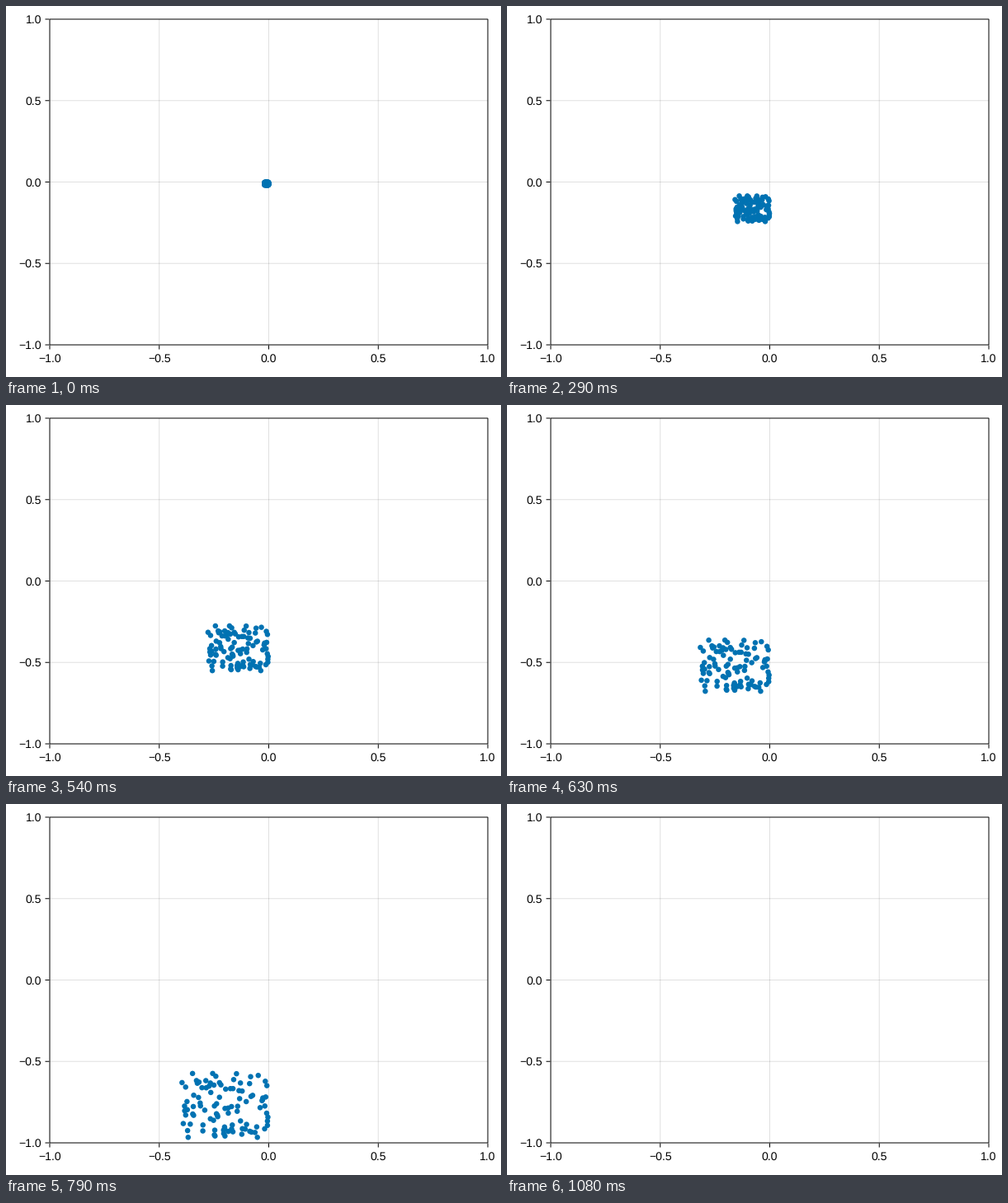
A matplotlib script for the animation above (4180 ms loop, 600 by 450 pixels).

```python
import numpy as np
import matplotlib.pyplot as plt
from matplotlib.animation import FuncAnimation
from matplotlib.patches import Rectangle

plt.rcParams["text.hinting"] = "none"

W, H, DPI = 600, 450, 100
PX = 72 / DPI                       # one pixel in points
LEFT, RIGHT, TOP, BOTTOM = 53, 584, 16, 411
LOOP, TICK, FPS = 4180, 10, 24      # ms, ms, steps per second
COUNT, DT, FALL = 100, 0.02, 0.003  # particles, step length, drop gained per step

# Leftward and downward launch speeds; a few fixed ones mark the cloud's edge
EDGE = [(0.99, 0.15), (0.87, 0.01), (0.64, 0.01), (0.12, 0.04),
        (0.01, 0.68), (0.13, 0.99), (0.50, 0.97), (0.92, 0.99)]
rng = np.random.default_rng(7)
speeds = np.vstack([EDGE, rng.uniform(0.01, 0.98, (COUNT - len(EDGE), 2))])


def to_px(x, y):
    return (LEFT + (x + 1) / 2 * (RIGHT - LEFT),
            BOTTOM - (y + 1) / 2 * (BOTTOM - TOP))


def positions(step):
    n = step + 1
    x = -speeds[:, 0] * DT * n
    y = -speeds[:, 1] * DT * n - FALL * n * (n - 1) / 2
    return np.column_stack(to_px(x, y))


def step_at(tick):
    """Last step begun by this tick; step times round to whole ticks."""
    rate = 1000 / TICK / FPS
    step = int(tick / rate) + 1
    while int(step * rate + 0.5) > tick:
        step -= 1
    return step


fig = plt.figure(figsize=(W / DPI, H / DPI), dpi=DPI, facecolor="white")
ax = fig.add_axes([0, 0, 1, 1])
ax.set_xlim(0, W)
ax.set_ylim(H, 0)
ax.axis("off")


def line(xs, ys, z=3, alpha=1):
    ax.plot(xs, ys, color="black", alpha=alpha, lw=PX, zorder=z,
            solid_capstyle="butt", snap=False)


def label(x, y, text, ha):
    ax.text(x, y, text, ha=ha, va="baseline", color="black",
            family="Liberation Sans", size=14 * PX)


def frame_box(**style):
    return Rectangle((LEFT, TOP), RIGHT - LEFT, BOTTOM - TOP, **style)


for v in np.linspace(-1, 1, 5):
    x, y = to_px(v, v)
    if abs(v) < 1:
        line([x, x], [TOP, BOTTOM], z=1, alpha=0.12)
        line([LEFT, RIGHT], [y, y], z=1, alpha=0.12)
    line([x, x], [BOTTOM + 0.5, BOTTOM + 5.5])
    line([LEFT - 5.5, LEFT - 0.5], [y, y])
    text = f"{v:.1f}".replace("-", "\u2212")
    label(x, 432, text, "center")
    label(43, y + 5, text, "right")

ax.add_patch(frame_box(fill=False, ec="black", lw=PX, zorder=3, snap=False))

# One size per dot keeps their subpixel positions
dots = ax.scatter(*positions(0).T, s=np.full(COUNT, (6.5 * PX) ** 2),
                  color="#0072B2", linewidths=0, zorder=2)
dots.set_clip_path(frame_box(transform=ax.transData))


def update(tick):
    dots.set_offsets(positions(step_at(tick)))
    return (dots,)


anim = FuncAnimation(fig, update, frames=LOOP // TICK, interval=TICK,
                     repeat=True, repeat_delay=0, blit=False)
plt.show()
```
